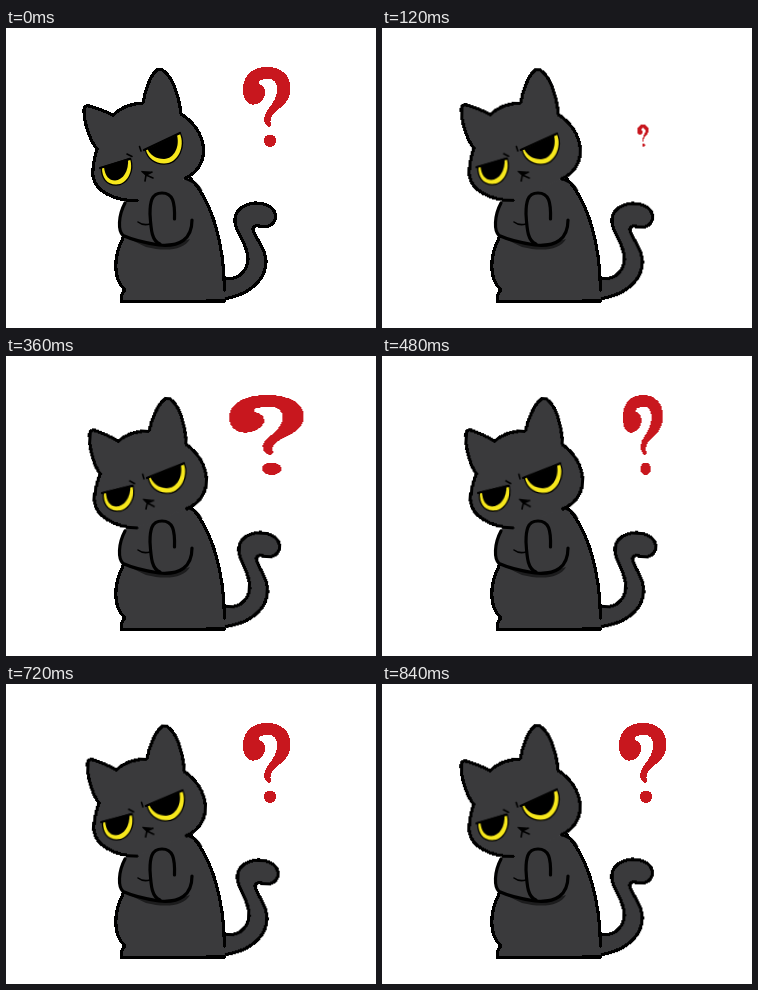
Write an HTML page that moves like this. It is 370 px wide and 300 px high and loops after 960 ms.

```html
<!DOCTYPE html>
<html lang="en">
<head>
<meta charset="utf-8">
<title>Doubtful cat</title>
<style>
  html, body { margin: 0; width: 100%; height: 100%; overflow: hidden; background: #fff; }
  svg { display: block; width: 370px; height: 300px; }
  .fur { fill: #3a3a3c; }
  .line { fill: none; stroke: #000; stroke-width: 3.2; stroke-linecap: round; stroke-linejoin: round; }
  .fur.line { fill: #3a3a3c; }
  .thin { stroke-width: 1.6; }
  .lid { stroke-width: 2.2; }
  .edge { shape-rendering: crispEdges; }
  .shade { fill: #1c1c1d; }
  .iris { fill: #f7e81c; stroke: #000; stroke-width: 2.6; stroke-linejoin: round; paint-order: stroke; }
  #head { transform-origin: 140px 168px; }
  #tail { transform-origin: 222px 264px; }
  #mark { transform-origin: 261px 119px; fill: #c8171e; }
</style>
</head>
<body>
<svg viewBox="0 0 370 300">
  <g id="tail">
    <path class="fur line edge" d="M217 271C240 268 260 254 260 233C260 219 247 208 247 201C248 197 251 197 253 198C262 201 270 196 269.500 187C268 178 258 175 249 175C236 176 228 184 229 194C230 206 242 216 242 231C241 246 229 253 217 250"/>
  </g>

  <g id="body">
    <path class="fur" d="M119 174C113 188 112 202 117 209C109 226 106 250 119 262Q115 264 115 273L219 273C219 235 214 180 184 150L131 160Z"/>
    <path class="line edge" d="M117 210C108 228 106 250 119 262Q115 264 115.500 273.600L219 273"/>
    <path class="line edge" d="M184 150C206 173 218 215 218.500 262"/>
    <path d="M177 151Q188 148 197 163Q187 154 177 151Z"/>
  </g>

  <g id="head">
    <path class="fur line edge" d="M131 172.500C108 173 89 163 87 148C86 137 89 129 91 121C83 111 78 94 78 82Q78 77 83 78Q95 81 107 87Q118 76 137 75C139 62 145 46 151 42Q155 40 159 44C167 51 173 68 175 86C185 92 197 105 197.500 121C198 135 191 144 180 150"/>
    <path class="iris" d="M96 140L124 131C128 143 121 156.500 110 156.500C101 156.500 96 150 96 140Z"/>
    <path d="M98 139L122 131C123 143 117 152 109 152.500C103 152.500 99 148 98 139Z"/>
    <path class="iris" d="M140 122L174 106C179 117 173 135.500 158 135.500C149 135.500 142 130 140 122Z"/>
    <path d="M141.500 121L171 107C174 119 168 130.500 158 131C150 131 144 127 141.500 121Z"/>
    <path class="line lid" d="M94 140L124 131M138 122L174 105"/>
    <path class="line thin" d="M121 126L126 128.500M133.500 118.500L135 123M136 143.500L140 147L146 144M139 153L140 147L147 150"/>
    <path d="M136 143L145 143.500L140 148Z"/>
  </g>

  <g id="arms">
    <path class="shade" d="M117 208C135 216 160 220 184 211C178 222 160 224 140 219Z"/>
    <path class="line" d="M119 175C112 188 112 203 117 207.500C127 212 140 215 153 217C174 219 186 211 186 192"/>
    <path class="line" d="M168.500 191C169 174 167 165 156 165C145 165 144 175 144 186C145 203 146 213 154 216"/>
    <path class="line thin" d="M132 194Q137 198 144 196"/>
  </g>

  <g id="mark" class="edge">
    <path d="M237 61C237 47 247 39 261 39C276 39 284.500 48 284.500 60C284.500 74 275 79 269 84C264 89 264 92 265 97Q264 100 261 98C256 93 258 86 263 80C268 74 271 68 271 61C271 54 267 50 261 51C255 51 251 53 253 56C258 57 260 62 259 67C256 76 247 79 242 75C238 72 237 67 237 61Z"/>
    <circle cx="264" cy="112.700" r="6.200"/>
  </g>
</svg>
<script>
  const STEP = 120;
  const lean = [0, 0.25, 0.6, 0.95, 1, 0.95, 0.6, 0.2];
  const pop = [[1, 1], [0.23, 0.28], [0.42, 0.89], [1.57, 1], [0.85, 1], [1, 1], [1, 1], [1, 1]];

  // Holds each pose for one step, then jumps to the next.
  function playSteps(id, poses) {
    const frames = [...poses, poses[0]].map((transform, i) => ({
      transform, offset: i / poses.length, easing: 'steps(1, end)'
    }));
    document.getElementById(id).animate(frames, {
      duration: poses.length * STEP, iterations: Infinity
    });
  }

  playSteps('head', lean.map(k => `rotate(${k * 3.9}deg)`));
  playSteps('tail', lean.map(k => `rotate(${k * 3.3}deg)`));
  playSteps('mark', pop.map(([x, y]) => `scale(${x}, ${y})`));
</script>
</body>
</html>
```
